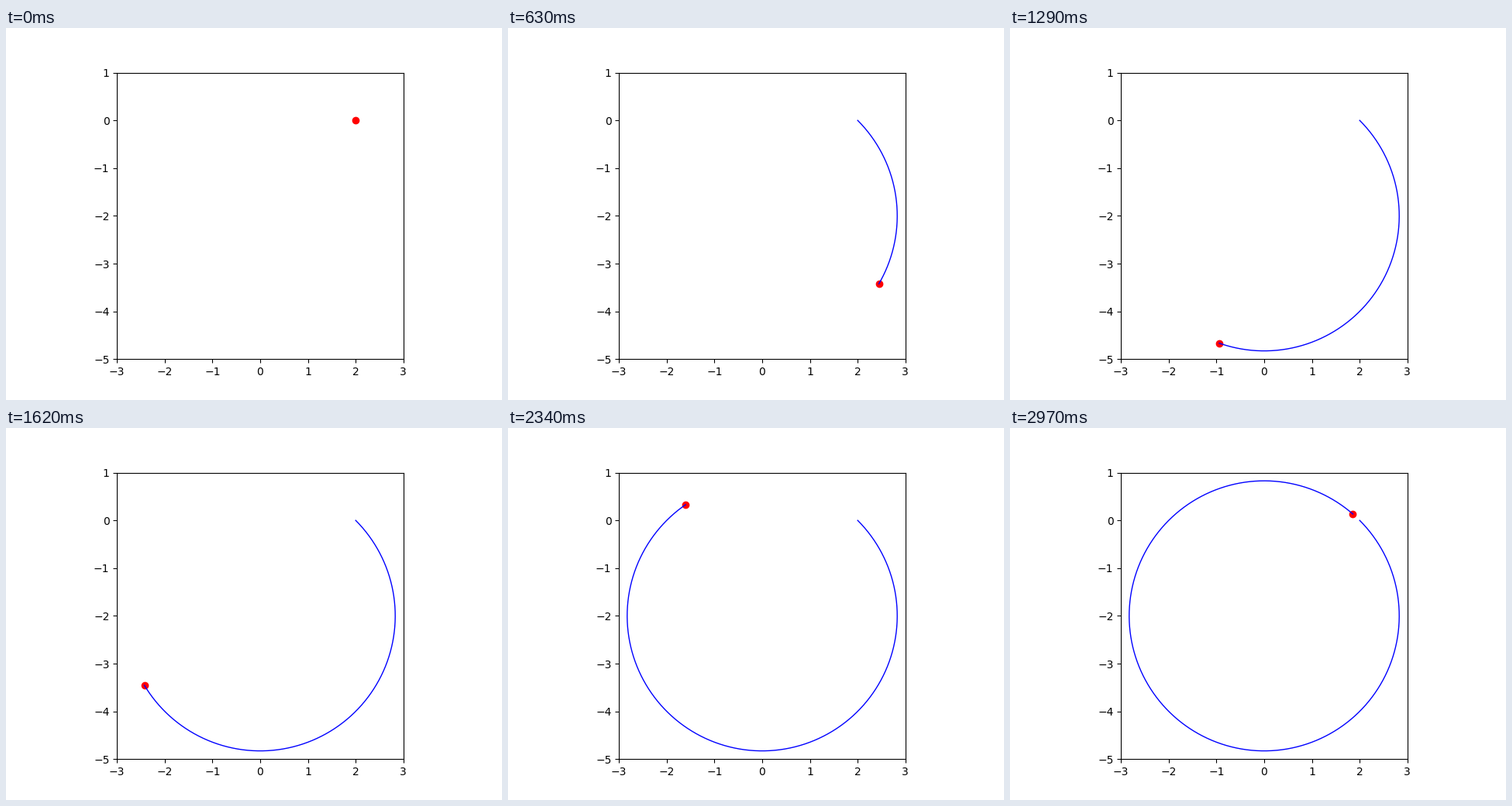
A matplotlib script that plays this animation: 640x480 px, repeating every 3000 ms.

```python
import numpy as np
import matplotlib.pyplot as plt
from matplotlib.animation import FuncAnimation

FRAMES = 100
INTERVAL = 30
SAMPLES = 1000
STEP = SAMPLES // FRAMES

# Clockwise circle through (2, 0), centred on (0, -2)
t = 2 * np.pi * np.arange(SAMPLES) / SAMPLES
radius = np.hypot(2, 2)
x = radius * np.cos(np.pi / 4 - t)
y = -2 + radius * np.sin(np.pi / 4 - t)

fig, ax = plt.subplots(figsize=(6.4, 4.8), dpi=100)
ax.set_aspect("equal")
ax.set_xlim(-3, 3)
ax.set_ylim(-5, 1)

point, = ax.plot([], [], "ro")
trail, = ax.plot([], [], "b-", lw=1)


def update(i):
    n = i * STEP
    head = max(n - 1, 0)
    trail.set_data(x[:n], y[:n])
    point.set_data([x[head]], [y[head]])
    return point, trail


ani = FuncAnimation(fig, update, frames=FRAMES, init_func=lambda: update(0),
                    interval=INTERVAL, repeat=True, repeat_delay=0)
plt.show()
```
